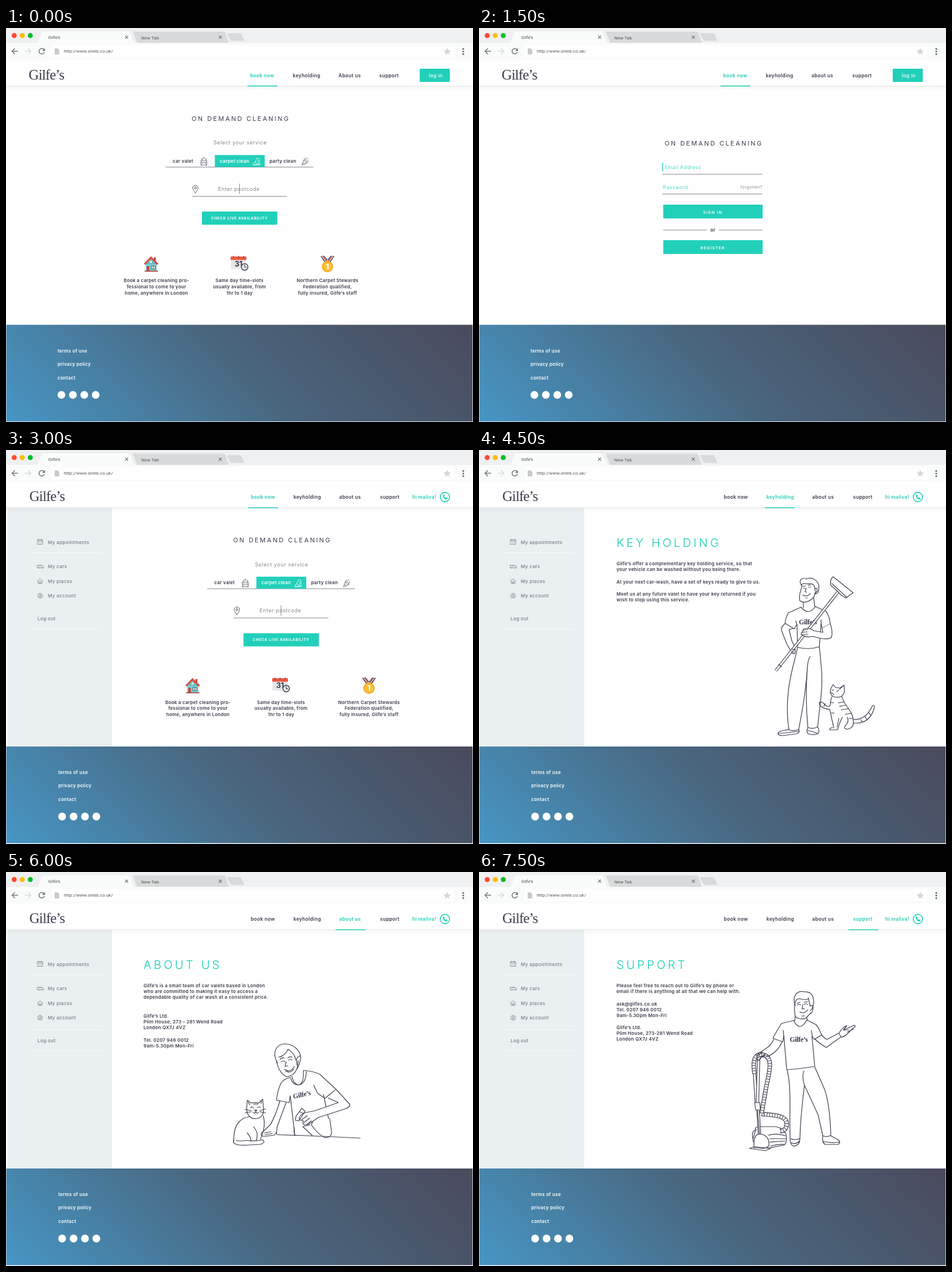
Animation of 815x687 px, one loop 8 s. Source, as an HTML page:

```html
<!DOCTYPE html>
<html lang="en">
<head>
<meta charset="utf-8">
<title>Cleaning site walkthrough</title>
<style>
html, body { margin: 0; width: 100%; height: 100%; overflow: hidden; background: #fff; }
svg { display: block; width: 815px; height: 687px; font-family: Inter, "Open Sans", sans-serif; }
text { white-space: pre; fill: #3b3a4b; }
.chrome { font: 8px Roboto, sans-serif; fill: #555; }
.logo { font: 25px "Liberation Serif", serif; letter-spacing: -.9px; }
.nav { font-size: 8.4px; font-weight: 600; letter-spacing: .35px; }
.title { font-size: 11px; letter-spacing: 2.45px; }
.head { font-size: 20.4px; font-weight: 300; letter-spacing: 4.1px; fill: #16cdb5; }
.hint { font-size: 9px; letter-spacing: .6px; fill: #85858d; }
.copy { font-size: 8px; font-weight: 600; letter-spacing: .26px; }
.side { font-size: 8px; font-weight: 500; letter-spacing: .4px; fill: #757c86; }
.foot { font-size: 8px; font-weight: 600; letter-spacing: .28px; fill: #fff; }
.cta { font-size: 6.2px; font-weight: 700; letter-spacing: .77px; fill: #fff; }
.sign { font-size: 6.8px; font-weight: 600; letter-spacing: 1.25px; fill: #fff; }
.field { font-size: 8.5px; letter-spacing: .5px; fill: #45dac7; }
.small { font-size: 7px; letter-spacing: .4px; fill: #85858d; }
.login { font-size: 8.4px; font-weight: 500; letter-spacing: .35px; fill: #fff; }
.day { font-size: 13px; font-weight: 700; letter-spacing: -.5px; }
.first { font-size: 12.5px; font-weight: 800; }
.shirt { font: 700 12px "Liberation Serif", serif; text-anchor: middle; letter-spacing: -.3px; }
.teal { fill: #1fcdb7; }
.white { fill: #fff; }
.mid { text-anchor: middle; }
.rule { stroke: #88878f; fill: none; }
.icon { stroke: #55545f; stroke-width: .8; fill: none; stroke-linejoin: round; stroke-linecap: round; }
.ink { stroke: #3b3a4c; stroke-width: 1.2; fill: none; stroke-linejoin: round; stroke-linecap: round; }
.solid { fill: #fff; }

.page { visibility: hidden; animation: 8s step-end infinite; }
.guest { animation-name: guest; }
.member { animation-name: member; animation-delay: -5s; }
.view { animation-name: view; animation-delay: calc(var(--start) * 1s - 8s); }
.last { animation-name: last; animation-delay: -.5s; }
@keyframes guest { 0% { visibility: visible } 37.5%, 100% { visibility: hidden } }
@keyframes member { 0% { visibility: visible } 62.5%, 100% { visibility: hidden } }
@keyframes view { 0% { visibility: visible } 18.75%, 100% { visibility: hidden } }
@keyframes last { 0% { visibility: visible } 6.25%, 100% { visibility: hidden } }
</style>
</head>
<body>
<svg id="stage" viewBox="0 0 815 687"></svg>
<script>
const BRAND = 'Gilfe’s', TEAL = '#22d0ba';

const text = (x, y, cls, s) => `<text x="${x}" y="${y}" class="${cls}">${s}</text>`;
const path = (d, cls = 'ink', more = '') => `<path d="${d}" class="${cls}" ${more}/>`;
const rect = (x, y, w, h, fill, r = 0) => `<rect x="${x}" y="${y}" width="${w}" height="${h}" rx="${r}" fill="${fill}"/>`;
const dot = (x, y, r, fill) => `<circle cx="${x}" cy="${y}" r="${r}" fill="${fill}"/>`;
const shape = (d, fill) => `<path d="${d}" fill="${fill}"/>`;
const line = (d, color, w) => `<path d="${d}" fill="none" stroke="${color}" stroke-width="${w}"/>`;
const move = (x, y, s, more = '') => `<g transform="translate(${x} ${y}) ${more}">${s}</g>`;
const shifted = s => move(1.2, -.6, s);
const lines = (x, rows, cls = 'copy') => rows.map(([y, s]) => text(x, y, cls, s)).join('');
const page = (cls, s, start = 0) => `<g class="page ${cls}" style="--start:${start}">${s}</g>`;
const tube = (d, w) => line(d, '#3b3a4c', w) + line(d, '#fff', w - 2.3);
const hose = d => tube(d, 7.5) +
  `<path d="${d}" fill="none" stroke="#3b3a4c" stroke-width="6" stroke-dasharray="1 3.6"/>`;

function browser() {
  const cross = x => line(`M${x - 2.6} 13.4l5.2 5.2m0-5.2l-5.2 5.2`, '#666', 1.1);
  return rect(0, 0, 815, 26, '#eff0f1') + rect(0, 26, 815, 29, '#fafbfb') + rect(80, 30, 702, 21, '#fff', 2) +
    shape('M221 6H379Q382 6 383 9L389 26H229Z', '#d9dadb') +
    shape('M388 9H408Q410 9 411 11L416 22.5H394Q392 22.5 391 20L386 11Q386 9 388 9', '#d9dadb') +
    shape('M55 26L62 9Q63 6 66 6H212Q215 6 216 9L224 26Z', '#fafbfb') +
    dot(14.3, 13.2, 4.4, '#ff4b34') + dot(28.4, 13.2, 4.4, '#ffbd05') + dot(42.4, 13.2, 4.4, '#05bd2c') +
    text(73.5, 19.3, 'chrome', BRAND) + text(236, 19.6, 'chrome', 'New Tab') + cross(210.5) + cross(374) +
    line('M21 40.5H10.5M15.5 35.5L10.5 40.5L15.5 45.5', '#747679', 1.5) +
    line('M33 40.5H43.5M38.5 35.5L43.5 40.5L38.5 45.5', '#dadbdc', 1.5) +
    line('M66.5 38A4.8 4.8 0 1 0 67 42', '#747679', 1.5) + shape('M68 35v5h-5Z', '#747679') +
    shape('M85 35.5h5l3 3v7.5h-8Z', '#c8c9ca') + text(101, 43.3, 'chrome', 'http://www.oriels.co.uk/') +
    shape('M770 34.5l1.9 4.3 4.7.4-3.6 3 1.1 4.6-4.1-2.5-4.1 2.5 1.1-4.6-3.6-3 4.7-.4Z', '#d5d6d7') +
    [36.5, 41, 45.5].map(y => dot(798, y, 1.6, '#66686b')).join('');
}

function nav(active, about = 'about us') {
  const items = [[426, 'book now', 421.5], [500.5, 'keyholding', 498], [580.3, about, 574], [651.5, 'support', 643.5]];
  return items.map(([x, s], i) => text(x, 85.5, i === active ? 'nav teal' : 'nav', s)).join('') +
    rect(items[active][2], 100.4, 52, 1.6, TEAL);
}

const header = () => rect(-2, 101, 819, 10, 'url(#shade)') + rect(-2, 100.7, 819, .8, '#e3e4e5') + text(39.5, 90, 'logo', BRAND);

const dusk = y => rect(.6, y, 813.7, 168.6, 'url(#dusk)');

const links = () => lines(90, [[565.5, 'terms of use'], [589, 'privacy policy'], [612.5, 'contact']], 'foot') +
  [96.7, 116.7, 136.6, 156.5].map(x => dot(x, 639.7, 6.8, '#fff')).join('');

const loginButton = () => rect(722, 71, 52.5, 23, TEAL, 1) + text(738, 85.5, 'login', 'log in');

const greeting = () => text(709, 85, 'nav teal', 'hi maliva!') +
  `<circle cx="766" cy="82" r="8.1" fill="none" stroke="${TEAL}" stroke-width="1.6"/>` +
  shape('M762.5 78.5l1.5-1.3 1.8 2.5-1 1.3q.8 1.7 2.4 2.6l1.3-1 2.5 1.8-1.3 1.7c-3.5 1-8-4-7.2-7.6', TEAL);

const sidebar = x => rect(x, 101.5, 182.5, 415.5, '#eaeff1') + rect(x, 101, 182.5, 9, 'url(#shade)') +
  [179.5, 275.5, 311.5].map(y => rect(x + 39, y - .5, 127, 1, '#f6f8f9')).join('') +
  lines(73, [[163.5, 'My appointments'], [205.7, 'My cars'], [231.7, 'My places'], [257.2, 'My account']], 'side') +
  text(55, 296.7, 'side', 'Log out') +
  `<g opacity=".75">` + path('M54.5 156.5h9.5v8h-9.5ZM54.5 159h9.5M57 155v2.5M61.5 155v2.5M57 162h1M60.5 162h1', 'icon') +
  path('M54.5 205V201H62L65.5 203V205ZM58 201v2M61 201v2M57 206.5v-1.5M63 206.5v-1.5', 'icon') +
  path('M55 228.5L59.5 224.5L64 228.5M56 228v4.5h7V228M58.5 232.5v-3h2v3', 'icon') +
  path('M63.7 254a4.2 4.2 0 1 1-8.4 0a4.2 4.2 0 1 1 8.4 0M56.5 257q3-3 6 0M61 253a1.5 1.5 0 1 1-3 0a1.5 1.5 0 1 1 3 0', 'icon') + `</g>`;

const house = () => rect(258, 400, 3.5, 8, '#c9473c') + rect(244, 409, 19, 15, '#77d2da') +
  shape('M253 398L266 411L263.5 413L253 403L243 413L240.5 411Z', '#dd4a3c') + shape('M253 403L262 412H244Z', '#5cbdc9') +
  dot(253, 408, 2, '#f5f0d8') + rect(245.5, 415, 4.5, 9, '#c9473c') + rect(253, 414.5, 8, 6, '#44566b') +
  rect(254, 415.5, 2.5, 4, '#f5f0d8') + rect(257.5, 415.5, 2.5, 4, '#f5f0d8') + rect(242, 423, 23, 1.8, '#a9463f');

const calendar = () => rect(392.5, 400, 26.5, 20, '#e6e7e8', 1) + rect(392, 398.5, 27.5, 6, '#ee5840', 1) +
  [396, 405, 414].map(x => rect(x, 397.5, 1.6, 4, '#b23a2c')).join('') + text(399, 416, 'day', '31') +
  `<circle cx="416.5" cy="416.6" r="5.7" fill="#e8eff2" stroke="#343443" stroke-width="1.4"/>` +
  path('M416.5 412.8V417H419.5');

const medal = () => shape('M549 398L555 397L564 408L558 411ZM573 398L567 397L558 408L564 411Z', '#2f3142') +
  line('M552 397.5L561 409.5M570 397.5L561 409.5', '#fff', 3) +
  line('M552.5 397.5L561.5 409.5M569.5 397.5L560.5 409.5', '#e14a41', 1.7) +
  dot(561, 416, 9.8, '#eea51d') + dot(561, 416, 8.2, '#fdc133') + text(561, 420.5, 'first mid white', '1');

const booking = () => text(324, 161.7, 'title', 'ON DEMAND CLEANING') + text(362, 203.2, 'hint', 'Select your service') +
  path('M278.5 242.5H536.5', 'rule') + rect(364.5, 221.5, 87, 21, TEAL) +
  text(291, 235, 'copy', 'car valet') + text(373.3, 235, 'copy white', 'carpet clean') + text(460, 235, 'copy', 'party clean') +
  path('M340 238.5v-4l2-3.5h6.5l2 3.5v4ZM340 234.5h10.5M342 236.5h1M347.5 236.5h1M341 238.5v1.5M349.5 238.5v1.5M339 232l2-1M351 232l-2-1M342 228a1 1 0 1 0 .1 0M345 225.5a1.2 1.2 0 1 0 .1 0M349 228a1 1 0 1 0 .1 0', 'icon') +
  path('M431.5 238.5q0-4 3.5-4t3.5 4ZM434.5 234.5L438 227q4-1 4 3l1 8.5H440v-8M431.5 238.5H443', 'icon', 'style="stroke:#fff"') +
  path('M516.5 239l3.5-9.5q4.5 2 6 5ZM518 235l3 2.5M519.5 231l4 4.5M521 229.5q-.5-2 1-3M523.5 230l2-3M525 232.5l3-1M525 227h.2M528 228.5h.2M526.5 234.5h.2', 'icon') +
  path('M330.5 287.5C327 283 325.8 281 325.8 279A4.7 4.7 0 0 1 335.2 279C335.2 281 334 283 330.5 287.5ZM332.3 279a1.8 1.8 0 1 1-3.6 0a1.8 1.8 0 1 1 3.6 0', 'icon', 'style="stroke-width:1"') +
  text(370, 284, 'hint', 'Enter postcode') + path('M407.5 271.5V289.5', 'rule') + path('M325 293.5H490', 'rule') +
  rect(342, 320, 131.5, 23, TEAL, 1) + text(407.7, 334, 'cta mid', 'CHECK LIVE AVAILABILITY') +
  house() + calendar() + medal() +
  lines(262.5, [[443.2, 'Book a carpet cleaning pro-'], [454, 'fessional to come to your'], [464.8, 'home, anywhere in London']], 'copy mid') +
  lines(407.5, [[443.2, 'Same day time-slots'], [454, 'usually available, from'], [464.8, '1hr to 1 day']], 'copy mid') +
  lines(561, [[443.2, 'Northern Carpet Stewards'], [454, 'Federation qualified,'], [464.8, `fully insured, ${BRAND} staff`]], 'copy mid');

const login = () => text(324, 205.3, 'title', 'ON DEMAND CLEANING') +
  rect(319.7, 235, 1.5, 14.5, TEAL) + text(324, 245.8, 'field', 'Email Address') + path('M320 255H494.5', 'rule') +
  text(321.3, 281, 'field', 'Password') + text(456.5, 280.2, 'small', 'forgotten?') + path('M320 289.5H494.5', 'rule') +
  rect(321.5, 308, 173.5, 24, TEAL, 1) + text(408, 323.6, 'sign mid', 'SIGN IN') +
  path('M321.5 352.3H398M418.5 352.3H494.5', 'rule') + text(408.2, 354.5, 'nav mid', 'or') +
  rect(321.5, 370, 173.5, 24, TEAL, 1) + text(408, 385.5, 'sign mid', 'REGISTER');

const sweeper = () =>
  path('M556 344C552 365 543 390 540 420C537 445 538 470 541 488Q550 491 558 487C562 465 570 430 573 380C570 420 571 455 574 484Q583 487 591 483C594 450 600 420 598 385L594 343') +
  path('M541 487C534 490 526 488 522 493Q521 498 530 498L553 495Q561 493 558 487M522 494Q535 494 559 490M574 484Q570 492 575 495Q586 498 592 494Q595 489 591 483M573 489Q582 490 590 494M573 380Q574 365 578 360') +
  path('M562 274L540 284Q536 290 534 302L550 312L555 304L556 344Q576 349 594 343L597 303L599 311L613 303Q611 287 605 281L587 273Q575 290 562 274', 'ink solid') +
  path('M553 298L555 306M597 296V305M566 264V275M584 257L586 273') +
  path('M534 303Q526 309 528 315L537 338L546 354M548 311L541 313L546 333L552 345M546 354Q552 358 552 350L550 343') +
  path('M564 237C561 246 558 254 560 263Q571 270 584 257L588 247', 'ink solid') +
  path('M563 237C556 225 566 221 571 225C582 220 595 229 593 241Q593 251 586 251M563 237Q563 232 568 233C575 235 581 230 585 237L587 246M586 242Q591 239 590 246L586 250') +
  path('M566 241h3M575 239h4M566 238l4-1M574 236l5-1M571 241L569 247L572 248M565 253Q574 257 578 250M570 258h3') +
  text(574, 304, 'shirt', BRAND) + tube('M518 385L627 247', 5.2) + path('M523 374L528 378M545 351L549 353') +
  path('M618 221Q612 226 614 236Q624 244 632 253L640 258L653 249C643 241 627 228 618 221ZM616 233Q630 246 642 257', 'ink solid') +
  path('M613 303Q618 317 615 327Q610 331 594 328L582 325Q570 328 562 321L567 312Q576 309 584 315L600 318L599 311', 'ink solid') +
  path('M565 314L574 313M563 318L573 317M565 322L574 321M546 347L551 349');

const playfulCat = () =>
  path('M616 430C611 440 616 449 608 447C602 445 600 437 594 440C593 447 603 452 612 452L619 484Q611 484 612 488H626C628 478 631 472 634 466M633 429C636 445 652 454 653 470Q656 485 642 487Q635 485 640 480M628 468L625 483M640 480Q646 474 643 466') +
  path('M653 470C670 471 680 460 686 447Q690 443 690 449C685 468 673 478 653 476M666 470L669 474M674 465L677 470M680 458L684 463') +
  path('M618 409L614 416C611 425 616 431 624 431Q636 432 638 420L637 410L630 415L622 414Z') +
  path('M616 419l3-1M624 421l4-2M614 423l3 1 2 3M629 417l5-4M613 440l6 1M627 441l10-2M629 447l11-2M632 453l13-2M615 458l5 1M639 461l11-2M646 468h7M604 442l-2 5');

const kneeler = () =>
  path('M497 358Q484 361 480 368Q474 380 472 398L494 402L496 390L504 459M519 346Q536 347 548 353L576 379L556 395M554 388L563 430M537 372L544 386L554 393') +
  path('M499 356Q502 371 511 371Q520 369 519 346M497 360C501 376 524 377 524 348') +
  path('M478 399C474 414 467 430 462 440L446 455Q443 460 450 461L468 459L472 454M489 402Q480 425 473 445L472 457M451 455L462 453M452 458L465 456') +
  path('M473 458Q502 459 530 460T618 464M503 446Q502 454 504 459M537 431L533 441Q543 456 556 463Q569 464 568 452L565 430M530 441L518 444L534 459') +
  path('M576 379L600 405Q601 410 592 413L545 428L528 440Q515 443 519 434L512 432Q510 425 521 420L540 416L566 407L580 402L562 394', 'ink solid') +
  path('M516 412L506 426L505 433L511 434L522 417ZM512 418L519 421M516 432L526 425M520 437L530 429M525 440L533 434') +
  path('M472 329C474 341 480 353 490 357Q502 356 508 343L510 329', 'ink solid') +
  path('M474 333C466 320 467 304 483 300C500 298 516 311 514 327Q512 336 508 343M476 323Q488 320 492 309Q503 315 506 328Q510 320 513 321M507 328L508 337') +
  path('M480 331q4-3 7 0M493 328q4-3 6 0M478 327q3-4 8-3M492 324q4-3 7-1M489 331L487 339L492 338M486 344Q497 351 503 339M488 347q8 5 14-3') +
  move(517, 392, text(0, 0, 'shirt', BRAND), 'rotate(-13)');

const sittingCat = () =>
  path('M424 427C410 428 399 441 398 458L397 470M449 425C453 440 449 455 444 466M432 444C440 454 439 460 437 468M421 455Q429 464 427 470') +
  path('M398 467C393 476 407 477 425 476L443 475Q454 472 448 467Q436 470 420 468Q406 470 402 468') +
  path('M421 398L420 412C420 425 428 431 437 430C447 429 451 420 449 409L448 396L441 403Q434 401 428 403Z', 'ink solid') +
  path('M427 411q3-3 5 1M439 411q3-3 5 0M434 415h4l-2 2ZM436 417v2q-3 3-5 0M436 419q3 3 5 0M428 416l-11-2M428 418l-11 2M443 416l10-3M443 418l10 2M433 403v3M436 402v4M439 403v3M423 401l2 5M446 399l-1 5');

const vacuum = () =>
  path('M483 449Q480 446 487 444H518Q532 447 536 458Q538 471 533 476L507 481Q479 482 478 466Z', 'ink solid') +
  path('M478 465Q475 450 484 450M505 459Q520 455 535 460M507 465H536M507 471L534 469M509 478Q521 474 533 475') +
  hose('M493 422C515 424 538 424 537 440Q537 451 525 452') + hose('M481 352C476 324 484 316 496 319C515 322 506 352 501 376L493 422') +
  tube('M481 352L484 402', 5.5) + tube('M488 326L486 400L491 480', 5.5) +
  path('M481 402H490L491 415H483ZM486 415L490 463', 'ink solid') +
  path('M480 481Q478 456 491 457Q507 459 506 477Q500 484 488 481ZM472 482L480 479L509 482L500 486Z', 'ink solid');

const helper = () =>
  path('M538 346C546 380 541 425 543 465Q552 468 560 465C561 430 565 395 568 372Q582 402 592 424L600 460Q608 463 614 459C613 425 609 390 600 372L586 340') +
  path('M543 465Q543 476 549 478Q560 477 560 465M545 472Q553 476 559 469M600 460Q598 473 605 475L627 475Q633 470 625 466L614 460M601 470Q615 473 629 471M568 372Q563 355 567 347') +
  path('M549 259L528 264Q519 278 513 290L530 296L532 286L537 345Q562 343 586 339L581 286L585 292L598 284Q592 270 588 266L572 258Q560 280 549 259', 'ink solid') +
  path('M531 276L532 288M580 276L582 288M552 250L551 260M572 253L573 259') +
  path('M514 292Q510 302 502 307L487 317Q482 325 488 329L493 323L499 320L504 322Q522 313 529 296M487 320L495 314M490 325L499 317') +
  path('M598 284Q603 290 607 292L628 281Q635 270 642 268L636 275Q646 272 655 267Q659 269 652 273L645 280Q638 288 631 288L606 306Q594 299 586 291M636 276L645 275M643 279L653 274M628 281L632 288') +
  path('M551 228Q550 244 552 252Q560 259 570 255L579 246', 'ink solid') +
  path('M552 233C546 217 554 206 568 209C582 208 586 220 583 234Q583 246 578 247M552 228Q553 220 560 221Q572 225 575 220L578 234M578 234Q583 230 582 237L578 242') +
  path('M556 232q3-3 5 0M568 231q3-3 5 0M555 229l5-2M567 227l7-1M565 231L564 239L568 238M560 244Q568 248 574 240M563 251h5') +
  text(558, 296, 'shirt', BRAND);

const keys = () => text(240, 168.7, 'head', 'KEY HOLDING') + lines(240, [
  [201, `${BRAND} offer a complementary key holding service, so that`], [211, 'your vehicle can be washed without you being there.'],
  [232.5, 'At your next car-wash, have a set of keys ready to give to us.'],
  [254, 'Meet us at any future valet to have your key returned if you'], [264, 'wish to stop using this service.']]) + sweeper() + playfulCat();

const about = () => text(240, 168.7, 'head', 'ABOUT US') + lines(240, [
  [201, `${BRAND} is a small team of car valets based in London`], [211, 'who are committed to making it easy to access a'],
  [221, 'dependable quality of car wash at a consistent price.'], [254.3, `${BRAND} Ltd.`],
  [264.3, 'Plim House, 273 – 281 Wend Road'], [274.3, 'London QX7J 4VZ'],
  [296, 'Tel. 0207 946 0012'], [306, '9am-5.30pm Mon-Fri']]) + kneeler() + sittingCat();

const support = () => text(240, 168.7, 'head', 'SUPPORT') + lines(240, [
  [201, `Please feel free to reach out to ${BRAND} by phone or`], [211, 'email if there is anything at all that we can help with.'],
  [232.5, 'ask@gilfes.co.uk'], [242.5, 'Tel. 0207 946 0012'], [252.5, '9am-5.30pm Mon-Fri'],
  [274, `${BRAND} Ltd.`], [284, 'Plim House, 273-281 Wend Road'], [294, 'London QX7J 4VZ']]) + vacuum() + helper();

document.getElementById('stage').innerHTML = `<defs>
  <linearGradient id="dusk" gradientUnits="userSpaceOnUse" x1="1" y1="686" x2="492" y2="195">
    <stop stop-color="#4696c5"/><stop offset=".5" stop-color="#49677f"/><stop offset="1" stop-color="#4a4a5c"/></linearGradient>
  <linearGradient id="shade" x2="0" y2="1"><stop stop-color="#000" stop-opacity=".035"/><stop offset="1" stop-color="#000" stop-opacity="0"/></linearGradient>
</defs>` + browser() +
  page('guest', header() + dusk(517.5) + links() + loginButton()) +
  page('member', dusk(517) + shifted(header() + links()) + greeting()) +
  page('view', nav(0, 'About us') + booking(), 0) +
  page('view', nav(0) + login(), 1.5) +
  page('view', sidebar(2.5) + shifted(nav(0)) + move(72.5, -.6, booking()), 3) +
  page('view', sidebar(1) + shifted(nav(1)) + keys(), 4.5) +
  page('view', sidebar(2.5) + shifted(nav(2)) + about(), 6) +
  page('last', sidebar(1) + shifted(nav(3)) + support());
</script>
</body>
</html>
```
